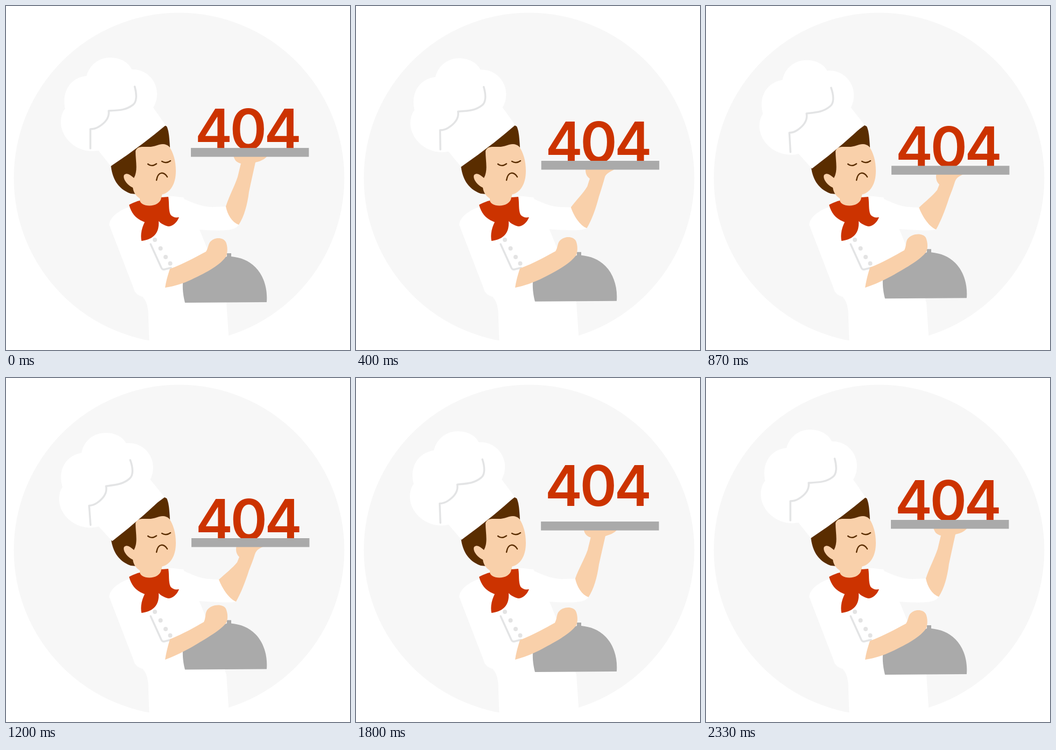
Write an HTML page that moves like this. It is 640 px wide and 640 px high and loops after 2390 ms.

```html
<!DOCTYPE html>
<html lang="en">
<head>
<meta charset="utf-8">
<title>404</title>
<style>
html, body { margin: 0; height: 100%; overflow: hidden; background: #fff; }
svg { display: block; width: 100%; height: 100%; }
.white { fill: #fff; }
.skin { fill: #f9d0aa; }
.hair { fill: #5a2d00; }
.red { fill: #cc3300; }
.metal { fill: #aaa; }
.line { fill: none; stroke: #e3e4e5; stroke-width: 3.5; stroke-linecap: round; stroke-linejoin: round; }
.face { fill: none; stroke: #5a2d00; stroke-width: 2.4; stroke-linecap: round; }
.buttons { fill: #e3e3e3; }
text { font: 600 104px Inter, sans-serif; text-anchor: middle; letter-spacing: -4.5px; }
</style>
</head>
<body>
<svg viewBox="0 0 640 640">
  <circle cx="322" cy="320" r="307.5" fill="#f7f7f7"/>
  <path class="white" d="M228 374C205 383 193 395 192 407L237 524C240 536 246 538 254 541C262 550 265 560 265 580L267 640H416L410 552L390 490L360 416L330 356L303 354Z"/>
  <path class="white" id="sleeve"/>
  <path class="skin" id="forearm"/>
  <g id="digits"><text class="red" x="448.500" y="266.500">404</text></g>
  <g id="tray"><rect class="metal" x="344" y="264" width="219.5" height="16.5"/></g>

  <path class="hair" d="M195 295C197 319 207 340 232 349L242 350L252 275L305 263C304 245 303 232 299 224L295 222Z"/>
  <path class="skin" d="M241 270C244 261 252 262 262 262C276 263 284 257 291 257C297 257 301 259 304 262C311 273 316 287 316 307C316 331 306 347 290 351L289 376H249L249 358C241 353 237 346 236 338C225 333 216 320 220 314C226 309 233 316 238 320C246 306 241 288 241 270Z"/>
  <path class="face" d="M264 294Q271 300 280 293.500M290 289Q298 294 306 288M280 324C283 307 294 308 300 318"/>
  <path class="red" d="M229 370C236 366 244 363 249 362C251 375 287 376 289 356L302 355C304 367 302 379 306 388C311 394 317 394 322 393C318 403 310 410 302 410C294 408 287 404 284 400C286 426 270 435 252 437C250 426 252 414 258 402C241 396 233 385 229 370Z"/>
  <path class="line" d="M269 443L289 487Q291 491 295 490L307 487"/>
  <g class="buttons">
    <circle cx="277" cy="435" r="4"/><circle cx="287.500" cy="451" r="4"/>
    <circle cx="297" cy="467" r="4"/><circle cx="305.500" cy="479" r="4"/>
  </g>

  <g id="hat">
    <path class="white" d="M195 298L172 269C135 276 103 248 102 217C102 206 105 197 110 191C103 158 121 133 150 130C155 110 173 96 193 96C213 96 228 105 234 118C262 117 281 140 281 163C281 174 278 182 274 189L297 222Q248 263 195 298Z"/>
    <path class="line" d="M239.500 150C244 166 243 179 236 184C223 194 210 194 191 195C193 209 182 219 172 225C167 228 162 229 157 229V265"/>
  </g>

  <g id="cloche"><path class="metal" d="M333 552L485 551C487 525 479 501 464 486C451 473 437 468 419 466V460H411V466C375 478 345 495 329 515C328 530 331 545 333 552Z"/></g>
  <path class="skin" id="lowerArm"/>
</svg>
<script>
const LOOP = 2390;
const part = id => document.getElementById(id);
const clamp = x => Math.min(1, Math.max(0, x));
const swing = x => (1 - Math.cos(Math.PI * x)) / 2;
const easeInOut = (t, from, to) => swing(clamp((t - from) / (to - from)));
const move = (id, x, y) => part(id).setAttribute('transform', `translate(${x} ${y})`);

// Each limb is a path blended between its two extreme poses.
const poses = {
  sleeve: [
    'M303 354C330 352 350 374 384 374L409 373L433 407C427 419 400 419 358 416Z',
    'M303 354C330 352 350 374 380 374L396 375L428 416C416 419 396 417 358 415Z'],
  forearm: [
    'M423 278L487 278C481 287 471 289 464 291C460 309 456 327 452 346C449 370 443 392 433 407C420 402 412 388 409 373C415 354 425 336 431 318L437 293C429 291 425 287 423 278Z',
    'M429 311L483 311C474 317 467 317 463 328C460 338 456 348 452 358C445 380 437 400 428 416C415 411 402 391 396 375C408 364 422 353 430 343L434 333C428 327 427 320 429 311Z'],
  lowerArm: [
    'M296 524C298 510 302 498 305 489C330 480 355 466 372 457C376 451 376 445 379 440C387 429 404 430 409 439C413 448 412 459 410 465C400 481 375 495 345 509C330 516 315 521 296 524Z',
    'M296 524C298 510 302 496 305 486C330 476 352 463 368 454C372 447 370 438 374 432C383 420 404 420 409 429C413 438 413 449 410 455C400 469 375 483 345 501C330 509 315 517 296 524Z']
};

function pose(id, k) {
  const [start, end] = poses[id];
  const goal = end.match(/[\d.]+/g);
  let i = 0;
  part(id).setAttribute('d', start.replace(/[\d.]+/g, n => (+n + (goal[i++] - n) * k).toFixed(2)));
}

function draw(now) {
  const t = now % LOOP;
  const sway = swing(2 * (t - 25) / LOOP);
  const lift = easeInOut(t, 1245, 1935);
  const dip = t < 1195 ? 1 - (1 - t / 1195) ** 3 : 1 - lift;
  // The digits are tossed past the tray and drop back onto it.
  const toss = 34.5 * (lift - easeInOut(t, 1935, 2360));

  part('hat').setAttribute('transform', `rotate(${-4.2 * sway} 272 265)`);
  move('cloche', 0, -9.5 * sway);
  pose('lowerArm', sway);
  move('tray', dip, 34 * dip);
  move('digits', dip, 34 * dip - toss);
  pose('sleeve', dip);
  pose('forearm', dip);
  requestAnimationFrame(draw);
}
requestAnimationFrame(draw);
</script>
</body>
</html>
```
